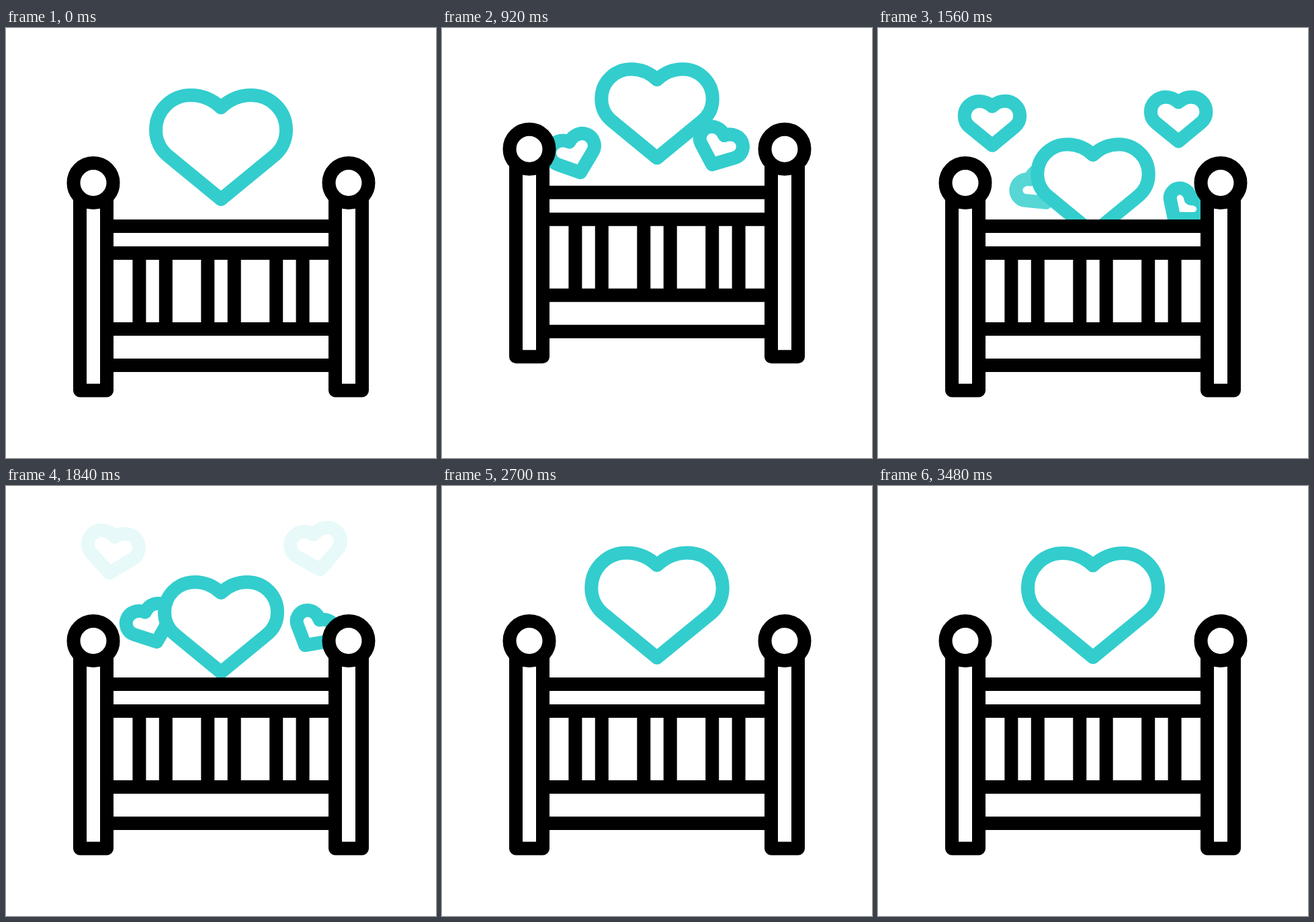
Write an HTML page that moves like this. It is 640x640 px and loops after 3.6 s.

```html
<!DOCTYPE html>
<html lang="en">
<head>
<meta charset="utf-8">
<title>Crib and hearts</title>
<style>
  html, body { margin: 0; width: 100%; height: 100%; overflow: hidden; background: #fff; }
  svg { display: block; width: 100%; height: 100%; }
  .ink { fill: none; stroke: #000; stroke-width: 20; stroke-linejoin: round; }
  .heart { fill: none; stroke: #33cdcd; stroke-linejoin: round; }
</style>
</head>
<body>
<svg viewBox="0 0 640 640">
  <defs>
    <clipPath id="above"><rect y="-100" width="640" height="395"/></clipPath>
    <g id="post">
      <path d="M-20 240V539.5H20V240"/>
      <circle cy="230.5" r="29.5" fill="#fff"/>
    </g>
  </defs>
  <g id="scene">
    <g id="hearts" clip-path="url(#above)"></g>
    <g class="ink">
      <path d="M150 295H490M150 335H490M150 448H490M150 502H490"/>
      <path id="bars"/>
      <use href="#post" x="130"/>
      <use href="#post" x="510"/>
    </g>
  </g>
</svg>
<script>
const LOOP = 3600, STEP = 20, WEIGHT = 20, LIFE = 1140, SMALL = 0.426;
const $ = id => document.getElementById(id);
const clamp = x => Math.min(1, Math.max(0, x));
const lerp = (a, b, p) => a + (b - a) * p;
const sine = x => (1 - Math.cos(Math.PI * x)) / 2;
const cubic = x => x < 0.5 ? 4 * x ** 3 : 1 - 4 * (1 - x) ** 3;

// Goes 0 to 1 between a and b, holds, and returns to 0 between c and d
function pulse(t, a, b, c, d, back = sine) {
  return sine(clamp((t - a) / (b - a))) - back(clamp((t - c) / (d - c)));
}

// Heart outline centred on the origin; the left half is the mirrored right half
function heartPath() {
  const half = s => `M0 -59C${12 * s} -70.5 ${28 * s} -77.5 ${45 * s} -77.5` +
    `C${74 * s} -77.5 ${97 * s} -54.5 ${97 * s} -25.5C${97 * s} -10 ${90 * s} 4 ${78 * s} 13.5L0 77.5`;
  return half(1) + half(-1);
}

function addHeart(fill) {
  const el = document.createElementNS('http://www.w3.org/2000/svg', 'path');
  el.setAttribute('class', 'heart');
  el.setAttribute('d', heartPath());
  el.setAttribute('stroke-linecap', 'round');
  if (fill) el.style.fill = fill;
  return $('hearts').appendChild(el);
}

function place(el, x, y, angle, scale) {
  el.setAttribute('transform', `translate(${x} ${y}) rotate(${angle}) scale(${scale})`);
  el.setAttribute('stroke-width', WEIGHT / scale);
}

// Small hearts drift from one pose (x, y, angle) to another
const floaters = [
  { born: 720, from: [205, 270, -26], to: [157.5, 96, 9] },
  { born: 720, from: [401.5, 258, 30], to: [463.5, 92, -11] },
  { born: 1420, from: [248, 257, -40], to: [157.5, 121, 10] },
  { born: 1380, from: [453, 300, 45], to: [464, 91, 7.5] }
].map(f => ({ ...f, el: addHeart() }));
const big = addHeart('#fff');

$('bars').setAttribute('d', [-1, 0, 1].flatMap(i =>
  [-1, 1].map(s => `M${320 + 101.9 * i + 19.7 * s} 335V448`)).join(''));

function drawFloater({ el, born, from, to }, t) {
  const p = clamp((t - born) / LIFE);
  const [x, y, angle] = from.map((v, i) => lerp(v, to[i], p));
  place(el, x, y, angle, SMALL * (1 - 0.0085 * Math.abs(angle)));
  el.setAttribute('opacity', clamp(Math.min(p, 1 - p) / 0.15));
}

function draw(t) {
  const lift = -60 * pulse(t, 280, 585, 710, 1320, cubic);
  const sink = 62 * pulse(t, 960, 1500, 1540, 2160);
  const shrink = 0.147 * pulse(t, 400, 820, 1700, 2420);
  const beat = 0.098 * pulse(t, 2640, 2980, 2980, 3440);
  $('scene').setAttribute('transform', `translate(0 ${lift})`);
  place(big, 320, 177.5 + sink, 0, 1 - shrink + beat);
  floaters.forEach(f => drawFloater(f, t));
}

const start = performance.now();
function tick() {
  const t = Math.max(0, performance.now() - start) % LOOP;
  draw(Math.floor(t / STEP) * STEP);
  requestAnimationFrame(tick);
}
tick();
</script>
</body>
</html>
```
